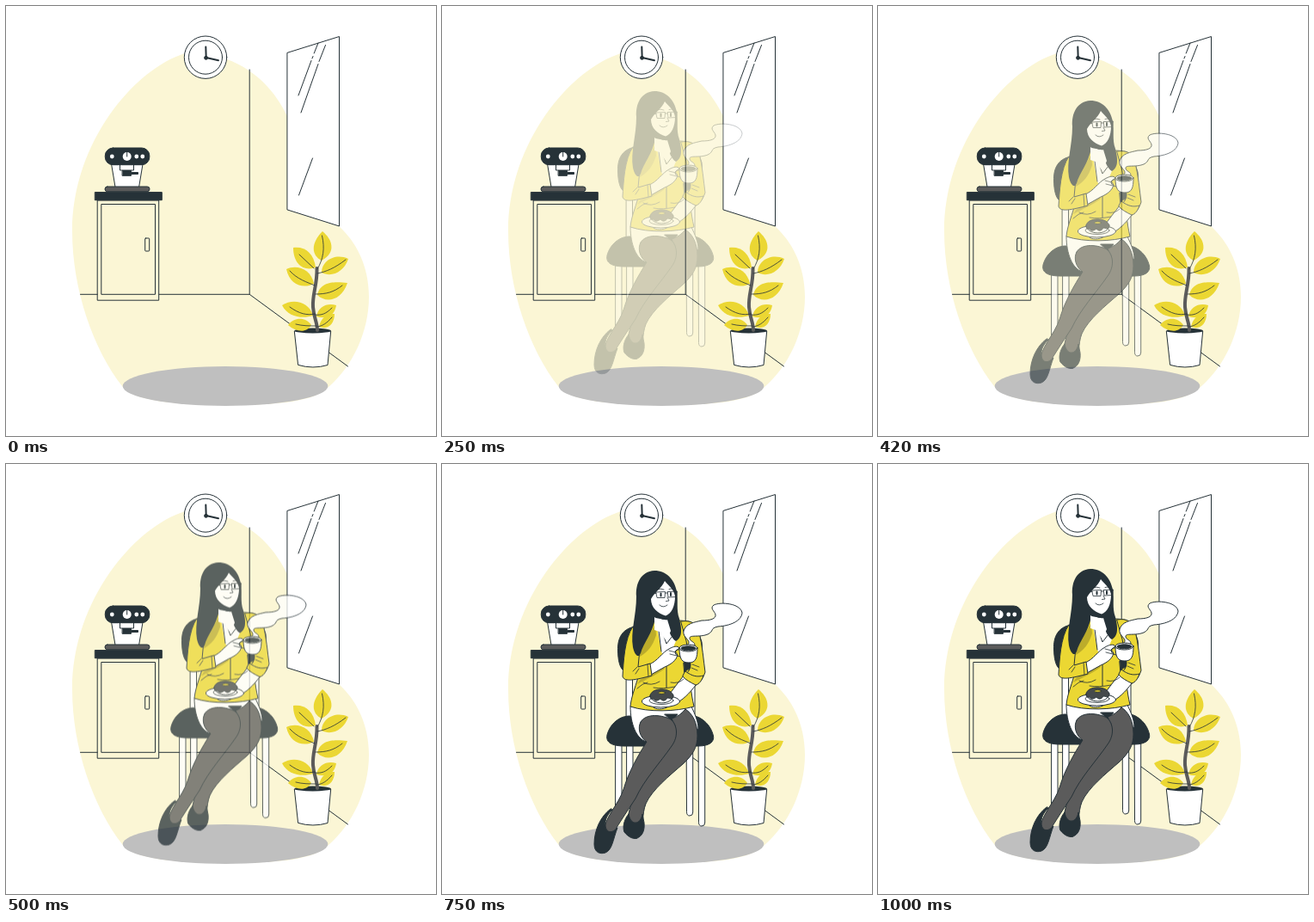
An HTML page without scripts for the animation above (1040 ms loop, 500 by 500 pixels).

```html
<!DOCTYPE html>
<html lang="en">
<head>
<meta charset="utf-8">
<title>Coffee break</title>
<style>
html, body { margin: 0; width: 100%; height: 100%; overflow: hidden; background: #fff; }
svg { display: block; width: 100vw; height: 100vh; }
.ln { fill: none; stroke: #263238; stroke-width: 1; stroke-linecap: round; stroke-linejoin: round; }
.thin { stroke-width: .8; }
.w { fill: #fff; }
.y { fill: #ebd733; }
.g { fill: #5b5b5b; }
.d { fill: #263238; }
.shade { fill: #bcac2b; }
.sitter { animation: drop 1040ms linear infinite; }
/* slides down while fading in, overshoots a little, then settles */
@keyframes drop {
  0%     { opacity: 0; transform: translateY(-28px); animation-timing-function: step-end; }
  12.5%  { opacity: .04; transform: translateY(-27.5px); animation-timing-function: steps(3); }
  24.04% { opacity: .26; transform: translateY(-23px); animation-timing-function: steps(4); }
  40.38% { opacity: .61; transform: translateY(-12px); animation-timing-function: steps(4); }
  55.77% { opacity: .9; transform: translateY(-3px); animation-timing-function: steps(4); }
  72.11% { opacity: 1; transform: translateY(2px); animation-timing-function: steps(4); }
  88.46% { opacity: 1; transform: translateY(1px); animation-timing-function: steps(2); }
  96.15%, 100% { opacity: 1; transform: none; animation-timing-function: step-end; }
}
</style>
</head>
<body>
<svg viewBox="0 0 500 500">
  <!-- room -->
  <path fill="#fbf6d5" d="M208 55C150 73 77 158 77 262C77 330 102 400 135 442C150 460 195 463 255 464C320 464 358 460 375 443C402 420 422 380 422 338C422 302 407 274 387 256L327 237V128C314 101 292 75 257 62Z"/>
  <path class="ln" d="M283.200 74V335.300M86.500 335.300H283.200L397.500 419"/>

  <!-- clock -->
  <g class="ln">
    <circle class="w" cx="232" cy="59.700" r="24.700"/>
    <circle class="w" cx="232" cy="59.700" r="19.500"/>
    <path stroke-width="2" d="M232.300 47.500L232.700 60L247 63.200"/>
    <circle class="d" cx="232.600" cy="60.300" r="2"/>
  </g>

  <!-- window -->
  <g class="ln">
    <path class="w" d="M327.300 54.300L387.500 35.500V256L327.300 237Z"/>
    <path d="M363 43L358.200 55M357 58.500L356 61M355 63.500L340 104M371.500 45.500L364 64.500M363 67.500L343 124M356.500 177L340.500 220"/>
  </g>

  <!-- cabinet -->
  <g class="ln">
    <path fill="#fbf6d5" d="M106.600 226H177.700V342.200H106.600Z"/>
    <path d="M111.200 230.500H173.500V335.300H111.200Z"/>
    <rect x="161.700" y="270" width="5" height="15" rx=".8"/>
    <path class="d" d="M103.700 216.600H181.300V225.700H103.700Z"/>
  </g>

  <!-- coffee machine -->
  <g class="ln">
    <path class="w" d="M123 184H159L154.500 211H127.500Z"/>
    <rect class="g" x="115" y="210" width="52" height="5.700" rx="2.800"/>
    <path class="w" d="M132.500 184V191H148.500V184"/>
    <path class="d" d="M135.500 191.500H145.500V193.500H153.500V195.500H145.500V197.300H135.500Z"/>
    <rect class="d" x="115.300" y="165" width="51.500" height="19.700" rx="9"/>
  </g>
  <g class="w">
    <circle cx="123.300" cy="175" r="2.400"/>
    <circle cx="140.700" cy="175" r="5"/>
    <circle cx="151.800" cy="175" r="2.400"/>
    <circle cx="158.800" cy="175" r="2.400"/>
  </g>
  <path class="ln" d="M140.700 170.500V175"/>

  <ellipse fill="#bfbfbf" cx="255" cy="442" rx="119.300" ry="23"/>

  <!-- plant -->
  <path class="ln w" d="M335.700 378H377.700L374 417.500Q357 422.500 340 417.500Z"/>
  <ellipse class="d" cx="356.700" cy="377.500" rx="21.200" ry="3"/>
  <g class="y">
    <path d="M368 262C379 271 385 286 367 296C355 290 354 276 368 262Z"/>
    <path d="M334 281C347 279 358 287 360 304C347 309 334 301 334 281Z"/>
    <path d="M398 294C393 309 379 316 367 310C367 296 383 287 398 294Z"/>
    <path d="M326 306C338 300 355 306 358 323C346 329 330 325 326 306Z"/>
    <path d="M397 322C386 321 366 318 362 336C372 346 390 343 397 322Z"/>
    <path d="M321 348C333 340 352 343 357 360C345 364 328 362 321 348Z"/>
    <path d="M384 348C374 345 363 349 361 361C371 364 382 362 384 348Z"/>
    <path d="M382 358C374 357 366 362 364 373C374 377 382 370 382 358Z"/>
    <path d="M328 371C335 362 348 361 355 371C350 380 338 380 328 371Z"/>
  </g>
  <path fill="none" stroke="#5b5b5b" stroke-width="4" stroke-linecap="round" d="M361.500 305C362 325 356 335 357 350C358 363 362 368 362 377"/>
  <path class="ln thin" d="M367.500 267C371 282 369 294 362 306M341 289L358 305M395 295C382 305 372 309 362 311M330 308C339 318 350 321 359 325M391 325C381 333 372 335 360 335M330 350C341 358 350 360 359 358M379 351C372 358 367 360 359 359M379 362C373 369 368 372 362 373M337 370C345 372 353 372 361 372"/>

  <g class="sitter">
    <!-- chair -->
    <g class="ln">
      <path class="w" d="M214.500 238H221.500V296H214.500ZM287 238H294V296H287Z"/>
      <path class="d" d="M224 187C209 190 204 201 204.500 215C205 232 208 241 222 243H290C300 238 304 222 302 205L296 187Z"/>
      <path class="w" d="M202 318H209V400H202ZM215 318H222V383H215ZM284.500 318H291.700V403Q291.700 407 288 407Q284.500 407 284.500 403ZM298.500 318H305.700V415Q305.700 419 302 419Q298.500 419 298.500 415Z"/>
      <path class="d" d="M220 291C206 290 195 301 192 313C190 322 198 326 212 326H298C311 326 317 321 315.500 314C313 303 304 292 290 290Z"/>
    </g>

    <!-- legs and shoes -->
    <g class="ln">
      <path class="w" d="M219 280C219 300 226 318 238 321L285 312L298 306C298 297 294 289 290 280Z"/>
      <path class="d" d="M259 289H274L267 297Z"/>
      <path class="g" d="M283 283C291 288 297 298 297 314C297 327 292 336 280 347C265 360 244 377 237 393C232 406 235 418 230 428H215C216 408 217 400 222 389C232 365 268 329 271 302L267 294C274 292 279 288 283 283Z"/>
      <path class="d" d="M217 405C211 412 210 421 212 426C216 431 221 434 226 433.500C233 431 236 424 235 415L233 405C231 418 219 419 217 405Z"/>
      <path class="g" d="M231 298C237 287 257 290 266 295C274 302 275 315 267 326C254 345 235 365 225 387C215 402 207 414 198 429H188C188 408 205 396 211.500 375C217 356 228 337 238 321C230 316 227 305 231 298Z"/>
      <path class="d" d="M196 399C184 408 177 424 177 440C177 450 184 452 190 450C198 447 199 434 204 421C198 428 191 427 190 419C189 411 193 405 198 400Z"/>
    </g>

    <!-- jacket, neck and right arm -->
    <g class="ln">
      <path class="y" d="M228 185C220 200 226 230 228 246C224 260 220 269 219 280C240 287 272 286 293 280C289 263 289 250 287 238L290 182C280 178 240 180 228 185Z"/>
      <path class="w" stroke="none" d="M247 166L250 188L255 216L261 229L269 211L277 192L264 166Z"/>
      <path d="M251 184L255 216M254 187L261 207L268 198M261 228V258"/>
      <path class="y" d="M278 181C290 179 297 184 299 194C303 210 304 226 306 240C303 249 299 253 294 256L282 244C286 240 289 237 289 231L284 204Z"/>
      <path class="d" d="M281 229L289 218L288 235L282 240Z"/>
      <path class="w" d="M281 244L298 251C291 261 282 271 274 275L262 270C267 261 276 251 281 244Z"/>
      <path class="y" d="M283 239C291 245 297 246 304 244C302 250 299 254 295 255C289 252 283 249 280 245Z"/>
      <path class="thin" d="M290 235L297 238M291 231L299 234M234 252Q243 257 253 251M266 252Q275 254 281 248M246 258Q256 260 271 257M227 259Q233 253 239 252"/>
    </g>

    <!-- left arm -->
    <path class="shade" d="M230 221C233 206 243 196 248 183L249 197C245 210 239 217 230 222ZM230 249L258 234L259 236C250 243 238 248 227 254Z"/>
    <g class="ln">
      <path class="w" d="M241 231C251 227 256 217 264 213C269 210 274 209 276 212L271 216L274 220C272 227 266 231 259 234L243 243Z"/>
      <path class="thin" d="M264 215L272 217M265 219L273 221"/>
      <path class="y" d="M222 187C212 201 211 229 210 245C212 252 225 249 244 244L242 230L228 234L230 213Z"/>
      <path class="thin" d="M222 239L227 234M225 242L229 236M239 231L240 245"/>
    </g>

    <!-- head -->
    <path class="d" d="M247 122C231 123 225 137 226 152C226 174 219 193 222 211C224 221 229 224 231 218C234 206 245 195 248 177L260 179C262 188 266 201 272 204C281 199 278 187 276 178C272 167 275 157 273 146C270 132 261 122 247 122Z"/>
    <path class="w" d="M247 176Q255 182 262 179L266 192L261 204L253 193L247 191Z"/>
    <path class="d" d="M243 163Q249 172 260 174L262 179Q253 180 246 172Z"/>
    <path class="w" d="M259 134C256 142 247 147 243 155C243 165 251 172 260 174.500C267 172 271 163 271 152C270 144 264 140 259 134Z"/>
    <g class="ln thin">
      <path d="M242 149L249 148.500M249 147L259.500 146.500L259 153.500H250.500ZM262.500 146.500L273.500 146L272.500 152.500L263.500 153ZM259.500 148H262.500M262 153L264 157L260.500 157.500M253 162Q257 166 262 162M250 144Q254 142 258 144M264 143.500Q267 142 269 144"/>
      <path stroke-width="2" d="M254.500 148.500V151.500M266 148V151"/>
    </g>

    <!-- steam and cup -->
    <g class="ln">
      <path class="w" d="M286 208C291 203 279 200 281 192C284 183 294 182 302 180C312 180 319 178 318 173C317 169 311 166 316 162C324 158 347 160 349 171C348 181 335 186 321 187C311 189 317 192 309 196C299 200 287 196 288 201C289 205 294 204 294 209Z"/>
      <path d="M277 214C269 212 269 222 278 222"/>
      <path class="w" d="M276 212C276 225 279 229 287 229C295 229 297 224 297 212Z"/>
      <ellipse class="w" cx="286.500" cy="212" rx="10.500" ry="4"/>
      <ellipse class="d" cx="286.500" cy="212.300" rx="8.500" ry="2.500"/>
    </g>

    <!-- plate and doughnut -->
    <g class="ln">
      <path class="w" d="M245 280C247 284 258 284 263 280Z"/>
      <ellipse class="w" cx="254.500" cy="274" rx="22" ry="7"/>
      <ellipse class="w thin" cx="255" cy="273" rx="14" ry="4.500"/>
      <path class="w" d="M242 267C243 279 268 279 269 267Z"/>
      <path class="thin" fill="#454a4c" d="M242 268C242 257 268 257 269 268C268 273 265 270 262 270C260 274 256 274 254 271C250 274 247 274 246 271C244 272 242 271 242 268Z"/>
      <ellipse class="shade thin" cx="255.500" cy="264" rx="4" ry="1.600"/>
    </g>
  </g>
</svg>
</body>
</html>
```
